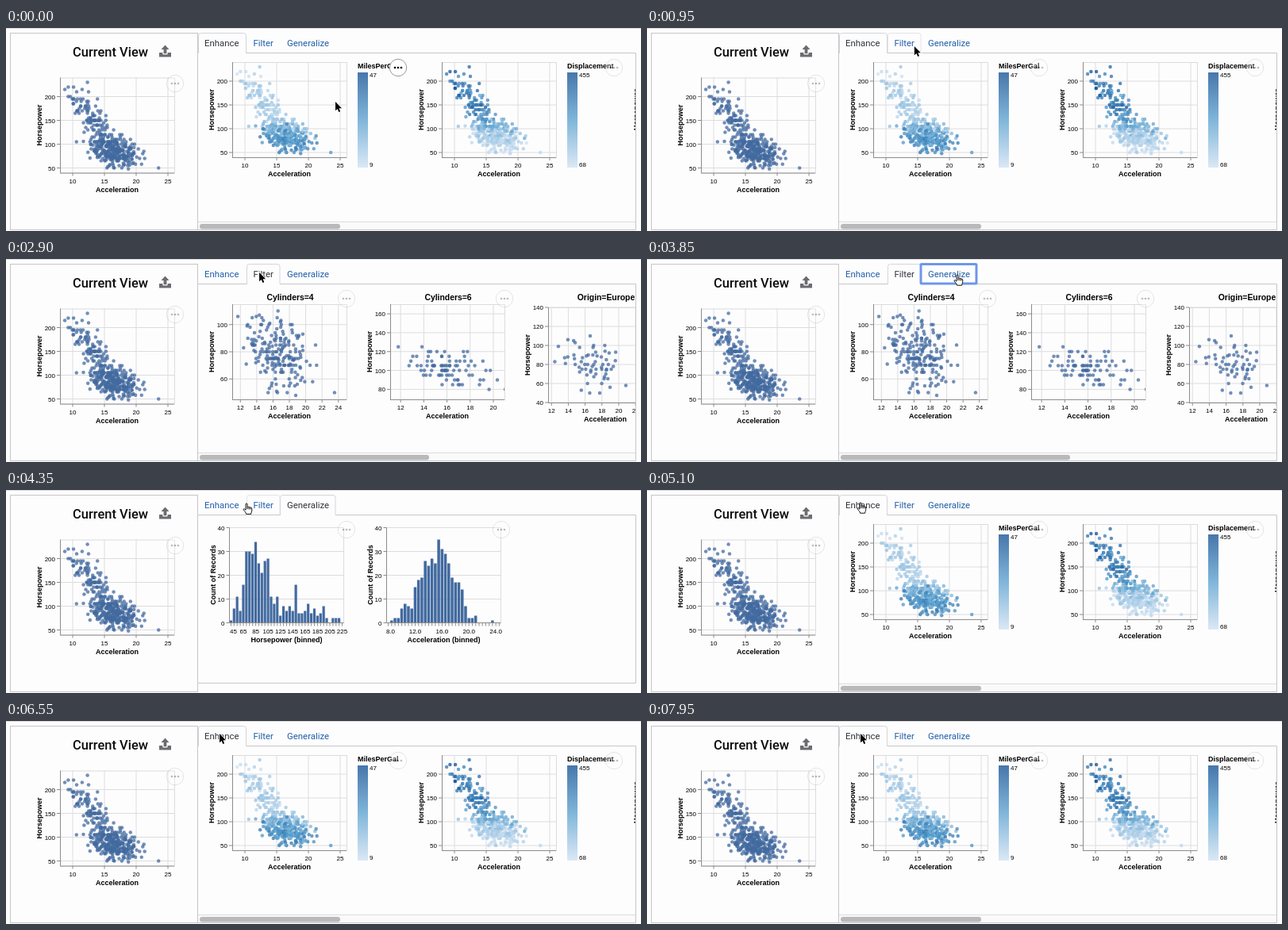
Animation of 800x256 px, one loop 8000 ms. Source, as an HTML page:

```html
<!DOCTYPE html>
<html lang="en">
<head>
<meta charset="utf-8">
<title>Chart recommendations</title>
<style>
html, body { margin: 0; width: 100%; height: 100%; overflow: hidden; background: #fefdfe; }
svg { display: block; }
#stage { width: 800px; height: 256px; }
text { font-family: "Liberation Sans", Arial, sans-serif; font-size: 8px; fill: #000; }
.label { font-size: 9px; font-weight: bold; }
.title { font-size: 10.4px; font-weight: bold; }
.mid { text-anchor: middle; }
.end { text-anchor: end; }
.heading { font: 500 16.5px Roboto, sans-serif; fill: #0c0c0e; }
.tab { font: 11.4px Roboto, sans-serif; fill: #205fa8; }
.tab.on { fill: #2f3338; }
.frame { fill: none; stroke: #c6c6c8; }
.grid { stroke: #dcdcde; }
.axis { stroke: #8c8c8c; }
</style>
</head>
<body>
<svg id="stage" viewBox="0 0 800 256" xmlns="http://www.w3.org/2000/svg"></svg>
<script>
const LOOP = 8000;
const W = 144, H = 120;
const BLUE = '#426a9f';

// ---- data: three engine groups, each a tilted normal cloud ---------------
let seed = 20417;
function rnd() {
  seed = (seed + 0x6D2B79F5) | 0;
  let t = Math.imul(seed ^ (seed >>> 15), 1 | seed);
  t = (t + Math.imul(t ^ (t >>> 7), 61 | t)) ^ t;
  return ((t ^ (t >>> 14)) >>> 0) / 4294967296;
}
const gauss = () => {
  let s = 0;
  for (let i = 0; i < 6; i++) s += rnd();
  return (s - 3) * 1.41;
};
const normal = (mean, dev) => mean + dev * gauss();

// power, accel, mpg and size are [mean, deviation]
const groups = [
  { cyl: 4, count: 200, power: [78, 14], accel: [16.4, 1.9], tilt: .06, mpg: [30, 5], size: [110, 22] },
  { cyl: 6, count: 84, power: [101, 11], accel: [16.3, 1.6], tilt: .08, mpg: [20, 3.5], size: [218, 28] },
  { cyl: 8, count: 104, power: [165, 29], accel: [12.7, 1.15], tilt: .045, mpg: [15, 2.4], size: [345, 40] }
];

function car({ cyl, power: [mean, dev], accel, tilt, mpg, size }) {
  let power = 46 + Math.abs(normal(mean, dev) - 46);
  if (cyl === 8 && rnd() < .2) power = 150;
  const step = cyl > 4 || rnd() < .4 ? 5 : 1;
  power = Math.min(230, Math.round(power / step) * step);
  const off = power - mean;
  return {
    cyl, power,
    accel: Math.max(8, normal(...accel) - tilt * off),
    mpg: normal(...mpg) - off * 5 / mean,
    size: normal(...size) + off * .7,
    europe: cyl === 4 && rnd() < .34,
    key: rnd()
  };
}

const cars = groups
  .flatMap(g => Array.from({ length: g.count }, () => car(g)))
  .sort((a, b) => a.key - b.key);

// ---- drawing helpers -------------------------------------------------------
const range = (from, to, step) =>
  Array.from({ length: Math.round((to - from) / step) + 1 }, (_, i) => from + i * step);
const line = (x1, y1, x2, y2, cls) =>
  `<line x1="${x1}" y1="${y1}" x2="${x2}" y2="${y2}" class="${cls}"/>`;
const text = (x, y, s, cls = '') => `<text x="${x}" y="${y}" class="${cls}">${s}</text>`;
const upright = (x, y, s) =>
  `<text transform="translate(${x} ${y}) rotate(-90)" class="label mid">${s}</text>`;
const dot = (x, y, fill = BLUE) =>
  `<circle cx="${x.toFixed(1)}" cy="${y.toFixed(1)}" r="2.25" fill="${fill}" opacity=".75"/>`;

const ramp = [[207, 225, 242], [85, 158, 205], [10, 74, 144]];
function shade(v) {
  v = Math.max(0, Math.min(1, v)) * 2;
  const i = v < 1 ? 0 : 1;
  return `rgb(${ramp[i].map((c, k) => Math.round(c + (ramp[i + 1][k] - c) * (v - i)))})`;
}

function button(x, y, id = '') {
  const dots = [-4, 0, 4].map(d => `<circle cx="${x + d}" cy="${y}" r="1.35"/>`).join('');
  return `<g id="${id}" opacity=".25"><circle cx="${x}" cy="${y}" r="10.7" fill="#fff"
    stroke="#999"/>${dots}</g>`;
}

function scatter({ x, y, xd, yd, xt, yt, rows = cars, color, title }) {
  const px = a => (a - xd[0]) / (xd[1] - xd[0]) * W;
  const py = p => H - (p - yd[0]) / (yd[1] - yd[0]) * H;
  const bottom = y + H;
  let s = `<rect x="${x + .5}" y="${y + .5}" width="${W}" height="${H}" fill="none" class="grid"/>`;
  for (const v of xt) {
    const cx = x + px(v);
    s += line(cx, y, cx, bottom, 'grid') + line(cx, bottom, cx, bottom + 4, 'axis')
      + text(cx, bottom + 13, v, 'mid');
  }
  for (const v of yt) {
    const cy = y + py(v);
    s += line(x, cy, x + W, cy, 'grid') + line(x - 4, cy, x, cy, 'axis')
      + text(x - 6, cy + 3, v, 'end');
  }
  s += line(x + .5, y, x + .5, bottom, 'axis') + line(x, bottom + .5, x + W, bottom + .5, 'axis');
  s += `<svg x="${x}" y="${y}" width="${W}" height="${H}">`
    + rows.map(c => dot(px(c.accel), py(c.power), color && color(c))).join('') + '</svg>';
  s += upright(x - 23, y + 60, 'Horsepower') + text(x + 72, bottom + 24, 'Acceleration', 'label mid');
  if (title) s += text(x + 73, 51.5, title, 'title mid');
  return s;
}

const fullView = {
  xd: [8, 26], yd: [40, 240], xt: range(10, 25, 5), yt: range(50, 200, 50)
};

function legend(x, name, high, low) {
  return text(x, 51, name, 'label')
    + `<rect x="${x}" y="56" width="13" height="120" fill="url(#ramp)" opacity=".75"/>`
    + text(x + 15, 62, high) + text(x + 15, 174.5, low);
}

function histogram(x, field, start, end, step, every, name) {
  const top = 47.5, bottom = 167.5, count = (end - start) / step, w = W / count;
  let s = '';
  for (const v of range(0, 40, 10)) {
    const y = bottom - v * 3;
    s += line(x, y, x + W, y, 'grid') + line(x - 4, y, x, y, 'axis') + text(x - 6, y + 3, v, 'end');
  }
  s += line(x + W, top, x + W, bottom, 'grid');
  for (let i = 0; i < count; i++) {
    const low = start + i * step, bx = x + i * w;
    const n = Math.min(40, cars.filter(c => c[field] >= low && c[field] < low + step).length);
    s += `<rect x="${bx + .3}" y="${bottom - n * 3}" width="${w - .7}" height="${n * 3}" fill="${BLUE}"/>`
      + line(bx + w / 2, bottom, bx + w / 2, bottom + 4, 'axis');
    if (i % every === 0)
      s += text(Math.max(bx + w / 2, x + 5), bottom + 13, step < 1 ? low.toFixed(1) : low, 'mid');
  }
  return s + line(x, top, x, bottom, 'axis') + line(x, bottom, x + W, bottom, 'axis')
    + upright(x - 18, 107, 'Count of Records') + text(x + 72, bottom + 24, name, 'label mid');
}

function panelFrame(bottom, thumb) {
  let s = '';
  if (thumb) {
    s += `<rect x="242" y="244" width="551" height="11" fill="#fafafa"/>`
      + line(242, 244.5, 793, 244.5, 'grid')
      + `<rect x="244" y="247" width="${thumb}" height="6.6" rx="3.3" fill="#b9b9bb"/>`;
  }
  return s + `<path d="M241.5 31.5H793.5V${bottom - .5}H241.5" class="frame"/>`;
}

// ---- scene -------------------------------------------------------------------
const tabs = [
  { name: 'Enhance', x: 242, w: 60, tx: 250 },
  { name: 'Filter', x: 303, w: 41.5, tx: 311.5 },
  { name: 'Generalize', x: 345, w: 69.5, tx: 354 }
];

const enhance =
  scatter({ ...fullView, x: 285, y: 43, color: c => shade((c.mpg - 9) / 38) })
  + legend(443, 'MilesPerGal', 47, 9)
  + scatter({ ...fullView, x: 549, y: 43, color: c => shade((c.size - 68) / 387) })
  + legend(707, 'Displacement', 455, 68)
  + upright(797, 103, 'Horsepower')
  + button(494, 50, 'hot') + button(766, 50);

const filter =
  scatter({
    x: 285, y: 57, xd: [11, 25], yd: [45, 115], xt: range(12, 24, 2), yt: range(60, 100, 20),
    rows: cars.filter(c => c.cyl === 4), title: 'Cylinders=4'
  }) + button(429, 50)
  + scatter({
    x: 484, y: 57, xd: [11.1, 20.96], yd: [69.4, 170.2], xt: range(12, 20, 2),
    yt: range(80, 160, 20), rows: cars.filter(c => c.cyl === 6), title: 'Cylinders=6'
  }) + button(628, 50)
  + scatter({
    x: 683, y: 61, xd: [11.6, 25.2], yd: [40, 140], xt: range(12, 24, 2), yt: range(40, 140, 20),
    rows: cars.filter(c => c.europe), title: 'Origin=Europe'
  });

const generalize =
  histogram(281.5, 'power', 45, 230, 5, 4, 'Horsepower (binned)') + button(429, 50)
  + histogram(479.5, 'accel', 8, 25, .5, 8, 'Acceleration (binned)') + button(624, 50);

const panels = [[enhance, 255, 177], [filter, 255, 289], [generalize, 244, 0]];

const upload = `<g fill="#6c6c70"><path d="M200.5 21.5l5 5.4h-3.1v5.3h-3.8v-5.3h-3.1z"/>
  <path d="M193 31h4.3v1.2q0 1.3 1.3 1.3h3.8q1.3 0 1.3-1.3V31h4.3v5.6h-15z"/></g>`;

const stage = document.getElementById('stage');
stage.innerHTML = `<defs>
    <linearGradient id="ramp" x2="0" y1="1" y2="0">${ramp.map((c, i) =>
      `<stop offset="${i / 2}" stop-color="rgb(${c})"/>`).join('')}</linearGradient>
    <clipPath id="clip"><rect x="242" y="31" width="551" height="224"/></clipPath>
  </defs>
  <rect width="800" height="256" fill="#fefdfe"/>`
  + line(0, .5, 800, .5, 'grid')
  + '<rect x="5.5" y="6.5" width="236" height="248" class="frame"/>'
  + text(84, 35.5, 'Current View', 'heading') + upload
  + scatter({ ...fullView, x: 68, y: 62.5 }) + button(213, 70)
  + panels.map(([body, bottom, thumb]) =>
    `<g class="panel"><g clip-path="url(#clip)">${body}</g>${panelFrame(bottom, thumb)}</g>`).join('')
  + '<path id="hover" fill="none" stroke="#e2e4e8"/><path id="active" fill="#fefdfe" stroke="#d3d5d9"/>'
  + '<path id="seam" stroke="#fefdfe" stroke-width="2"/>'
  + tabs.map(t => text(t.tx, 22.5, t.name, 'tab')).join('')
  + `<rect id="ring" y="6.5" height="24.5" rx="1" fill="none" stroke="#6c97ea" stroke-width="3"/>
  <g id="pointer">
    <path id="arrow" d="M0 0V11.3L2.5 8.9 4.4 13 6.2 12.2 4.5 8.2H8Z" stroke="#fff"
      stroke-width="1.4" paint-order="stroke"/>
    <path id="hand" d="M-1 .8C-1-.6 1-.6 1 .8V4.4C1.3 3.6 2.8 3.7 3 4.8 3.4 4.1 4.8 4.3 4.9 5.3
      5.4 4.7 6.7 5 6.7 6.1V8.8C6.7 10.4 5.8 11 5.6 13.2H-.4C-.6 11.6-2.2 9.8-3.7 8
      -4.4 7-3.2 6.1-2.4 6.9L-1 8.2ZM1 4.4V7M3 4.8V7.2M4.9 5.3V7.4" fill="#fff" stroke="#111"/>
  </g>`;

// ---- motion --------------------------------------------------------------------
// Each move: start, end, then the point reached.
const home = [415, 93];
const moves = [
  [300, 1100, 329, 16], [1600, 1800, 318, 17], [2850, 3550, 391, 20], [4100, 4485, 269, 16]
];
const openTab = [[0, 0], [2400, 1], [3900, 2], [4950, 0]];
const ringTab = [[0, -1], [1950, 1], [2400, -1], [3700, 2], [3900, -1], [4750, 0], [4950, -1]];
const handOn = [[0, 0], [1000, 1], [2650, 0], [3200, 1], [5250, 0]];

const at = (steps, t) => steps.filter(s => s[0] <= t).pop()[1];

function pointerAt(t) {
  let [x, y] = home;
  for (const [from, to, tx, ty] of moves) {
    const p = Math.max(0, Math.min(1, (t - from) / (to - from)));
    const e = p * p * (3 - 2 * p);
    x += (tx - x) * e;
    y += (ty - y) * e;
  }
  return [x, y];
}

const get = id => document.getElementById(id);
const show = (el, on) => { el.style.display = on ? '' : 'none'; };
const panelEls = stage.querySelectorAll('.panel');
const tabEls = stage.querySelectorAll('.tab');
const outline = ({ x, w }) =>
  `M${x + .5} 31.5V9.5q0-3 3-3H${x + w - 2.5}q3 0 3 3V31.5`;

function draw(t) {
  const open = at(openTab, t), ring = at(ringTab, t), hand = at(handOn, t);
  const [x, y] = pointerAt(t);
  panelEls.forEach((el, i) => show(el, i === open));
  tabEls.forEach((el, i) => el.classList.toggle('on', i === open));

  const tab = tabs[open];
  get('active').setAttribute('d', outline(tab));
  get('seam').setAttribute('d', `M${tab.x + 1} 31.5H${tab.x + tab.w}`);

  const over = y < 31 ? tabs.findIndex(b => x >= b.x - 1 && x < b.x + b.w) : -1;
  show(get('hover'), over >= 0 && over !== open);
  if (over >= 0) get('hover').setAttribute('d', outline(tabs[over]));

  show(get('ring'), ring >= 0);
  if (ring >= 0) {
    get('ring').setAttribute('x', tabs[ring].x);
    get('ring').setAttribute('width', tabs[ring].w + .5);
  }

  get('hot').setAttribute('opacity', t < 50 ? 1 : Math.max(.25, 1 - (t - 50) / 130));
  get('pointer').setAttribute('transform', `translate(${x.toFixed(2)} ${y.toFixed(2)})`);
  show(get('hand'), hand);
  show(get('arrow'), !hand);
}

const start = performance.now();
function tick() {
  draw((performance.now() - start) % LOOP);
  requestAnimationFrame(tick);
}
draw(0);
requestAnimationFrame(tick);
</script>
</body>
</html>
```
